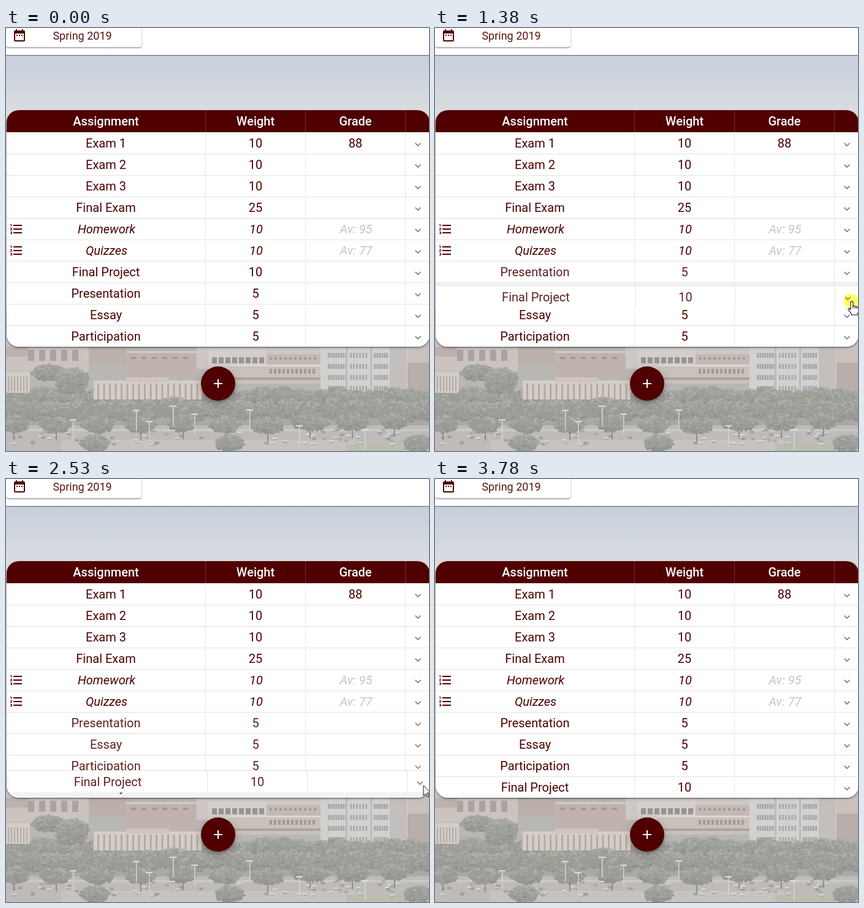
An HTML page with a canvas for the animation above (3930 ms loop, 690x690 px).

```html
<!DOCTYPE html>
<html lang="en">
<head>
<meta charset="utf-8">
<title>Grade table</title>
<style>
html, body { margin: 0; width: 100%; height: 100%; overflow: hidden; }
#stage { position: relative; width: 690px; height: 690px; overflow: hidden; font: 20px Roboto, sans-serif; color: #4c0000; }
#stage * { box-sizing: border-box; }
#photo, .bar, .term, .table, .row, .cell, .fab, .cursor, .icon { position: absolute; }
#photo { left: 0; top: 0; }
.bar { left: 0; top: 0; width: 690px; height: 44px; background: #fff; box-shadow: 0 1px 1px rgba(40, 46, 62, .6); }
.term { left: 0; top: -20px; width: 221px; height: 51px; border-radius: 4px; background: #fff;
  box-shadow: 0 2px 2px rgba(0, 0, 0, .2), 0 1px 3px rgba(0, 0, 0, .25); }
.term span { position: absolute; left: 28px; width: 193px; top: 20px; line-height: 26px; font-size: 18px; text-align: center; color: #5a1414; }
.term .icon { left: 9.5px; top: 20px; }
.table { left: 1px; top: 134px; width: 690px; border-radius: 20px; overflow: hidden; background: #fff; }
.shade { box-shadow: 0 1px 2px rgba(0, 0, 0, .5), 0 2px 4px rgba(0, 0, 0, .2); }
.row { left: 0; width: 690px; border-bottom: 1px solid #e3e3e3; background: #fff; }
.row.last { border-color: transparent; }
.cell { top: 0; height: 100%; display: flex; align-items: center; justify-content: center; border-right: 1px solid #e6e6e6; white-space: pre; }
.cell:last-child { border: 0; }
.head { top: 0; height: 36px; background: #500000; color: #fff; font-weight: 500; border: 0; }
.head .cell { border-color: #6f3038; }
.group { font-style: italic; }
.group .cell:not(:last-child) { padding-left: 2px; }
.group .cell:nth-child(3) { color: #c6c6c6; }
.row .icon { left: 4px; top: calc(50% - 12px); }
.chev { fill: #757575; position: relative; top: 2px; left: .5px; }
.soft { color: #602020; }
.soft .chev { fill: #93707a; }
.grey { background: #f3f3f3; }
.preview { height: 35px; border: 0; box-shadow: 0 -1px #e4e4e4; }
.icon { fill: #500000; }
.fab { left: 318px; width: 56px; height: 56px; border-radius: 50%; background: #500000;
  box-shadow: 0 3px 5px -1px rgba(0, 0, 0, .2), 0 6px 10px rgba(0, 0, 0, .14), 0 1px 18px rgba(0, 0, 0, .12); }
.fab svg { position: absolute; left: 21px; top: 21px; stroke: #fff; stroke-width: 2; }
.cursor { left: 0; top: 0; width: 1px; height: 1px; overflow: visible; }
#glow { mix-blend-mode: multiply; }
</style>
</head>
<body>
<div id="stage">
  <canvas id="photo" width="690" height="690"></canvas>
  <div class="bar"></div>
  <div class="term">
    <svg class="icon" width="24" height="24"><path d="M9 11H7v2h2zm4 0h-2v2h2zm4 0h-2v2h2zm2-7h-1V2h-2v2H8V2H6v2H5a2 2 0 0 0-2 2v14a2 2 0 0 0 2 2h14a2 2 0 0 0 2-2V6a2 2 0 0 0-2-2zm0 16H5V9h14z"/></svg>
    <span>Spring 2019</span>
  </div>
  <div class="table shade" id="table"></div>
  <div class="fab" id="fab"><svg width="14" height="14"><path d="M7 0V14M0 7H14"/></svg></div>
  <svg class="cursor" id="glow"><circle cx="-1" r="12" fill="#ffff6a"/></svg>
  <svg class="cursor" id="hand" fill="#fff" stroke="#111" stroke-width="1.1" stroke-linejoin="round">
    <g transform="translate(.5 1)">
      <path d="M-1.9 1.5a1.9 1.9 0 0 1 3.8 0V8c.6-1.2 3-1 3.3.5c.8-1 2.9-.6 3.1.8c.9-.8 2.9-.3 2.9 1.3V15c0 2-1.6 3.5-1.9 5.5V22H-.5V20.5C-1.8 18.5-4.6 15.5-5.7 13.4C-6.6 11.6-4.3 10.6-3.2 12L-1.9 13.6Z"/>
      <path d="M1.9 8v3.5M5.2 8.8v3M8.3 9.6v2.5"/>
    </g>
  </svg>
  <svg class="cursor" id="arrow" fill="#fff" stroke="#111" stroke-linejoin="round">
    <path d="M0 0V16.5L3.8 12.9L6.2 18.6L8.6 17.6L6.2 12H11.5Z"/>
  </svg>
</div>
<script>
const LOOP = 3930, ROW = 35, TALL = 48.1, MOVED = 6;
const $ = id => document.getElementById(id);
const table = $('table'), fab = $('fab');

const COLS = [[0, 325], [325, 163], [488, 163], [651, 39]];
const DATA = [
  ['Exam 1', 10, 88], ['Exam 2', 10], ['Exam 3', 10], ['Final Exam', 25],
  ['Homework', 10, 'Av: 95'], ['Quizzes', 10, 'Av: 77'],
  ['Final Project', 10], ['Presentation', 5], ['Essay', 5], ['Participation', 5]
];
const CHEVRON = '<svg class="chev" width="20" height="20" viewBox="0 0 24 24"><path d="M16.59 8.59L12 13.17 7.41 8.59 6 10l6 6 6-6z"/></svg>';
const LIST = '<svg class="icon" width="24" height="24"><path d="M2 17h2v.5H3v1h1v.5H2v1h3v-4H2zm1-9h1V4H2v1h1zm-1 3h1.8L2 13.1v.9h3v-1H3.2L5 10.9V10H2zm5-6v2h14V5zm0 14h14v-2H7zm0-6h14v-2H7z"/></svg>';

function makeRow(cells, cls, parent) {
  const row = document.createElement('div');
  row.className = 'row ' + cls;
  row.innerHTML = COLS.map(([x, w], i) =>
    `<div class="cell" style="left:${x}px;width:${w}px">${cells[i] ?? ''}</div>`).join('');
  parent.append(row);
  return row;
}

makeRow(['Assignment', 'Weight', 'Grade'], 'head', table);
const rows = DATA.map(([name, weight, grade = '']) => {
  const group = String(grade).startsWith('Av');
  return makeRow([(group ? LIST : '') + name, weight, grade, CHEVRON], group ? 'group' : '', table);
});
const preview = makeRow([...DATA[MOVED], '', CHEVRON], 'preview soft', $('stage'));
$('stage').insertBefore(preview, $('glow'));

// Pointer moves: start, end, steps, from, to, easing power
const MOVES = [
  [150, 310, 3, [688, 417], [678, 405], 1],
  [770, 1230, 7, [678, 405], [678, 431], 1.38],
  [1300, 1760, 7, [678, 431], [683, 480], 1],
  [1840, 2230, 6, [683, 480], [681, 500], 1],
  [3470, 3780, 5, [681, 500], [690, 687.5], 1]
];

function pointer(t) {
  let pos = null;
  for (const [start, end, n, a, b, pow] of MOVES) {
    if (t < start) break;
    const gap = (end - start) / (n - 1);
    const k = Math.min(n - 1, Math.floor((t - start) / gap + .001));
    const p = ((k + 1) / n) ** pow;
    pos = a.map((v, i) => v + (b[i] - v) * p);
  }
  return t >= 3780 ? null : pos;
}

function show(el, on, pos) {
  el.style.display = on ? '' : 'none';
  if (on) el.style.transform = `translate(${pos[0]}px,${pos[1]}px)`;
}

function render(t) {
  const pos = pointer(t);
  const dragging = t >= 770 && t < 2540;
  const tall = t >= 2610 && t < 2700;
  const h = tall ? TALL : ROW;
  const passed = t < 770 ? 0 : t >= 2230 ? 3
    : Math.max(0, Math.min(3, Math.floor((pos[1] - 415) / ROW) + 1));
  const hover = t >= 2770 && t < 3470;

  rows.forEach((row, i) => {
    const moved = i > MOVED && i <= MOVED + passed;
    const slot = i === MOVED ? i + passed : moved ? i - 1 : i;
    row.style.top = 37 + slot * h + 'px';
    row.style.height = h + 'px';
    row.classList.toggle('last', slot === 9);
    row.classList.toggle('grey', i === MOVED && (dragging || hover));
    row.classList.toggle('soft', dragging && (moved || i === MOVED) || i === MOVED && t >= 310 && t < 770);
  });
  table.style.height = 37 + 10 * h - 1 + 'px';
  fab.style.top = 552 + (tall ? 132 : 0) + 'px';

  show(preview, dragging, pos && [1 + pos[0] - 678, 381 + pos[1] - 405]);
  const arrow = t >= 2460 && t < 2770 || t >= 3470;
  show($('glow'), t >= 520 && t < 2460, pos);
  show($('hand'), pos && !arrow, pos);
  show($('arrow'), pos && arrow, pos);
}

function paintPhoto() {
  const c = $('photo').getContext('2d');
  let seed = 11;
  const rnd = () => (seed = seed * 16807 % 2147483647) / 2147483647;
  const box = (x, y, w, h, col) => { c.fillStyle = col; c.fillRect(x, y, w, h); };
  const slots = (x, y, n, step, w, h, col) => { for (let i = 0; i < n; i++) box(x + i * step, y, w, h, col); };
  const oval = (x, y, rx, ry, col) => { c.fillStyle = col; c.beginPath(); c.ellipse(x, y, rx, ry, 0, 0, 7); c.fill(); };

  const sky = c.createLinearGradient(0, 45, 0, 150);
  sky.addColorStop(0, '#c8cfdc');
  sky.addColorStop(1, '#dcdfe1');
  box(0, 0, 690, 690, sky);
  box(0, 170, 3, 290, '#e3d7d2');
  box(0, 460, 690, 230, '#b9b7b4');

  // far buildings
  box(0, 500, 135, 60, '#cbc3bf');
  slots(36, 525, 5, 18, 10, 18, '#aaa39f');
  box(0, 520, 36, 16, '#bdb1ad');
  box(135, 500, 62, 50, '#bbb0ab');
  box(196, 527, 115, 45, '#c0b3af');
  box(196, 527, 115, 3, '#d3cac6');
  slots(204, 536, 6, 17, 8, 4, '#a69a97');
  box(311, 500, 204, 56, '#cdc8c5');
  box(330, 525, 95, 32, '#d4cfcb');
  slots(336, 537, 8, 11, 8, 10, '#989493');
  box(425, 532, 88, 18, '#c3b8b4');
  slots(430, 537, 10, 8, 4, 4, '#a39b97');
  box(363, 549, 150, 31, '#cac1ba');
  box(363, 549, 150, 3, '#dbd7d2');
  slots(430, 556, 11, 7, 4, 8, '#a49a95');
  box(363, 570, 150, 4, '#aca49f');

  // tower with bands of windows
  box(513, 500, 142, 110, '#d3d1d0');
  for (let y = 530; y < 600; y += 18) {
    slots(525, y, 8, 4, 3, 8, '#a8a8aa');
    slots(561, y, 6, 5, 3, 8, '#acacad');
    slots(600, y, 6, 4, 3, 8, '#a8a8aa');
  }
  slots(554, 500, 2, 40, 3, 108, '#bebbb9');
  box(626, 500, 28, 108, '#c3bfbd');
  box(655, 500, 35, 46, '#cac1bc');
  box(655, 546, 35, 55, '#b8aeaa');

  // trees: a shaded crown with lighter leaves towards the top
  const leaves = ['#8f918c', '#9a9b96', '#a5a6a0', '#b0b0ab'];
  const tree = (x, y, w, h) => {
    oval(x, y, w / 2, h / 2, '#9b9c97');
    for (let i = 0; i < w * h / 9; i++) {
      const a = rnd() * 6.283, r = Math.sqrt(rnd()) * 1.08;
      const py = Math.sin(a) * r, size = .8 + rnd() * 1.3;
      const tone = Math.max(0, Math.min(3, Math.round(1.5 - py + rnd() * 2 - 1)));
      oval(x + Math.cos(a) * r * w / 2, y + py * h / 2, size * 1.4, size, leaves[tone]);
    }
  };
  box(0, 596, 690, 54, '#aaa9a5');
  for (let x = 0; x < 700; x += 30) tree(x, 598 + rnd() * 10, 46, 30);
  tree(70, 562, 54, 26);
  tree(108, 576, 52, 42);
  // low halls in front
  box(0, 561, 39, 34, '#d3cdc8');
  slots(3, 568, 7, 5, 2, 25, '#b6ada8');
  box(143, 575, 176, 31, '#d5cec7');
  box(196, 570, 70, 8, '#cdc6c0');
  slots(149, 580, 18, 9.5, 3, 26, '#b4aaa2');
  for (let x = 0; x < 720; x += 38) tree(x + rnd() * 8, 618 + rnd() * 10, 50, 32);

  // car park
  box(0, 648, 690, 42, '#bebbb8');
  box(0, 654, 690, 4, '#cac7c4');
  box(90, 672, 480, 18, '#c6c3c1');
  box(555, 679, 135, 11, '#b9beae');
  for (let i = 0; i < 90; i++) {
    const x = rnd() * 690, y = 652 + rnd() * 25;
    box(x, y, 7, 3, ['#d9d8d8', '#a3a2a2', '#b4afaf', '#d2d0cf'][i % 4]);
    box(x + 1, y + 3, 6, 1, '#949494');
  }
  for (let x = 12; x < 690; x += 69) {
    const y = 640 + rnd() * 14;
    box(x, y, 2, 26, '#8f8d89');
    tree(x, y, 44 + rnd() * 16, 26);
  }
  [145, 365, 672].forEach(x => tree(x, 677, 46, 26));

  // street lamps
  for (const [x, y] of [[109, 638], [212, 623], [233, 641], [272, 616], [307, 629], [397, 622], [478, 648], [585, 654]]) {
    box(x, y, 1.5, 34, '#d6d5d4');
    box(x - 5, y, 11, 2, '#dedddc');
  }
}

paintPhoto();
const t0 = performance.now();
function tick() {
  render((performance.now() - t0) % LOOP);
  requestAnimationFrame(tick);
}
tick();
</script>
</body>
</html>
```
